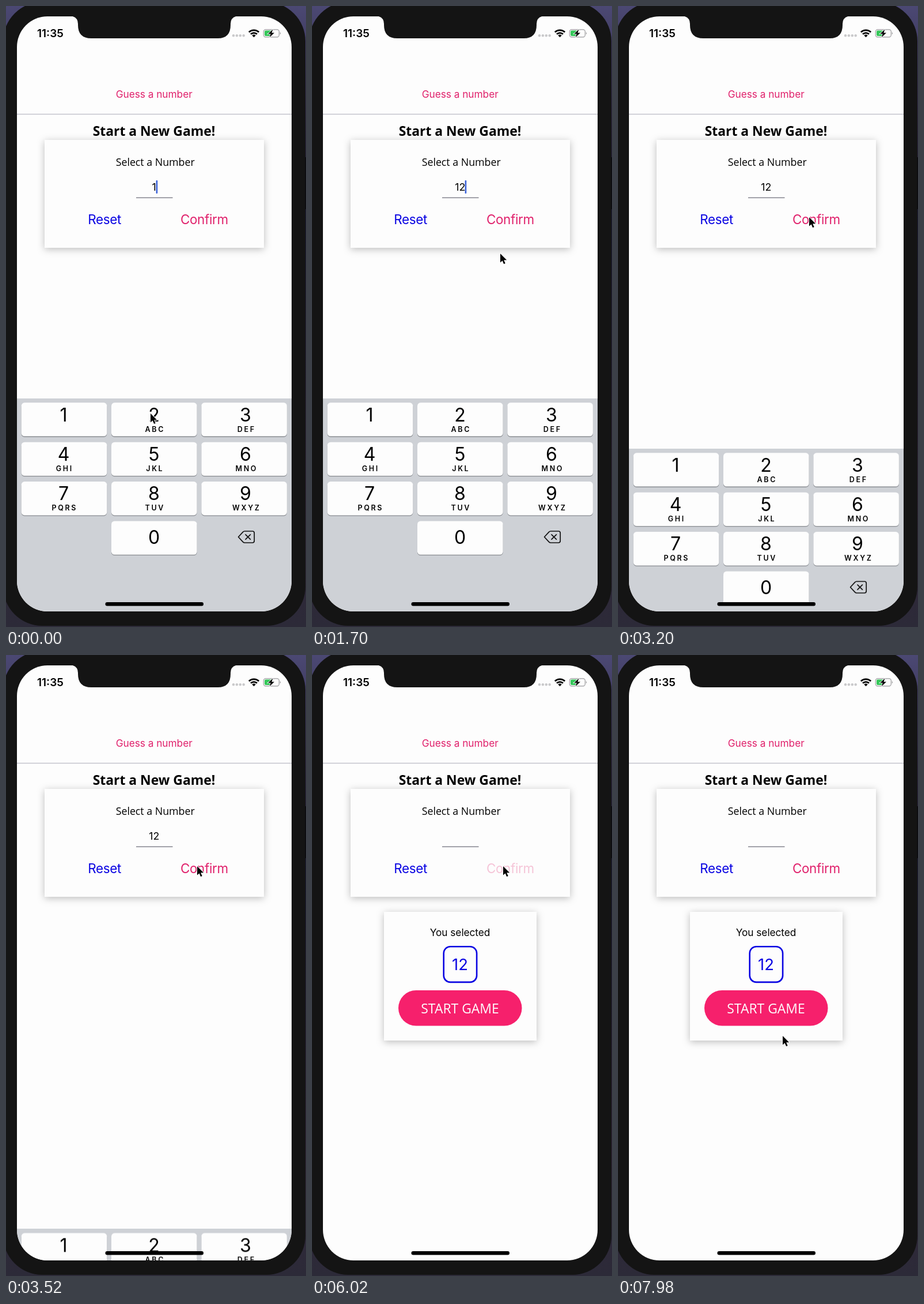
Animation of 521 by 1076 pixels, one loop 8000 ms. Source, as an HTML page:

```html
<!DOCTYPE html>
<html lang="en">
<head>
<meta charset="utf-8">
<title>Guess a number</title>
<style>
  html, body { margin: 0; width: 100%; height: 100%; overflow: hidden; background: #141414; }
  svg { display: block; width: 521px; height: 1076px; }
  text { font-family: Inter, "Liberation Sans", sans-serif; text-anchor: middle; }
  .open { font-family: "Open Sans", "Noto Sans", sans-serif; }
  .label { font-size: 17.3px; letter-spacing: -.05px; }
  .action { font-size: 22.4px; letter-spacing: -.3px; }
  .pink { fill: #e0206b; }
  .blue { fill: #0a04e2; }
  .digit { font-size: 32px; }
  .letters { font-size: 12.5px; font-weight: 600; letter-spacing: 2.7px; }

  .anim { animation: 8s linear infinite; }
  .step { animation-timing-function: step-end; }
  #one { animation-name: one; }
  #twelve { animation-name: twelve; }
  #caret { animation-name: caret; }
  #keyboard { animation-name: slide; }
  #confirm { animation-name: press; }
  #selected { animation-name: appear; }
  #pointer { animation-name: point; animation-timing-function: ease-in-out; }

  @keyframes one { 0% { opacity: 1 } 3.75%, 100% { opacity: 0 } }
  @keyframes twelve { 0% { opacity: 0 } 3.75% { opacity: 1 } 74.75%, 100% { opacity: 0 } }
  @keyframes caret {
    0% { transform: none; opacity: 1 }
    3.75% { transform: translateX(5px); opacity: 1 }
    38.5%, 100% { transform: translateX(5px); opacity: 0 }
  }
  /* critically damped spring, in three arcs */
  @keyframes slide {
    0% { transform: none }
    38.5% { transform: none; animation-timing-function: cubic-bezier(.5, 0, .67, .52) }
    40% { transform: translateY(86px); animation-timing-function: cubic-bezier(.33, .48, .67, .85) }
    44% { transform: translateY(314px); animation-timing-function: cubic-bezier(.2, .67, .4, 1) }
    51%, 100% { transform: translateY(371px) }
  }
  @keyframes press {
    0%, 72.5% { opacity: 1 }
    74.5%, 75.1% { opacity: .22 }
    79%, 100% { opacity: 1 }
  }
  @keyframes appear { 0% { opacity: 0 } 74.75%, 100% { opacity: 1 } }
  @keyframes point {
    0%, 8.5% { transform: translate(251px, 706px) }
    21%, 25% { transform: translate(327px, 429px) }
    34%, 82% { transform: translate(332px, 366px) }
    99%, 100% { transform: translate(286px, 660px) }
  }
</style>
</head>
<body>
<svg viewBox="0 0 521 1076">
  <defs>
    <linearGradient id="backdrop" x1="0" y1="0" x2="0" y2="1">
      <stop offset="0" stop-color="#4b4873"/>
      <stop offset=".2" stop-color="#2e2742"/>
      <stop offset=".35" stop-color="#191a33"/>
      <stop offset=".8" stop-color="#32263a"/>
      <stop offset="1" stop-color="#2c2a38"/>
    </linearGradient>
    <clipPath id="screen"><rect x="19" y="18" width="477" height="1031" rx="53"/></clipPath>
    <filter id="shadow" x="-20%" y="-20%" width="140%" height="140%">
      <feDropShadow dx="0" dy="2.5" stdDeviation="6.5" flood-opacity=".26"/>
    </filter>
  </defs>

  <rect width="521" height="1076" fill="url(#backdrop)"/>
  <rect x="-5" y="-7" width="525" height="1081" rx="68" fill="#141414"/>
  <rect x="519" y="262" width="2" height="90" fill="#0c0c10"/>

  <g clip-path="url(#screen)">
    <rect x="19" y="18" width="477" height="1031" fill="#fdfdfd"/>
    <path d="M110 17 Q125 18 125 31 V33 Q125 56 148 56 H368 Q390 56 390 33 V31 Q390 18 405 17Z" fill="#141414"/>

    <text x="54" y="54" style="font-size:19px;font-weight:600;text-anchor:start">11:35</text>
    <g id="dots" fill="#c9c9cb"></g>
    <g fill="none" stroke="#000" stroke-width="2.7">
      <path d="M421.8 45.3 A12.6 12.6 0 0 1 439.2 45.3"/>
      <path d="M425 48.8 A8 8 0 0 1 436 48.8"/>
    </g>
    <path d="M427.3 51 A4.8 4.8 0 0 1 433.7 51 L430.5 54.3Z"/>
    <rect x="447.3" y="40.8" width="27" height="13" rx="3.6" fill="none" stroke="#9c9c9f" stroke-width="1.2"/>
    <path d="M475.8 45 Q478.6 47.3 475.8 49.6Z" fill="#9c9c9f"/>
    <rect x="449" y="42.5" width="12.5" height="9.6" rx="2" fill="#34c759"/>
    <path d="M463.5 40.6 L455 48.3 H459.6 L457.6 54.3 L466 46.4 H461.4Z" stroke="#fdfdfd" stroke-width="1.6" paint-order="stroke"/>

    <text class="label pink" x="257.2" y="159">Guess a number</text>
    <path d="M19 187.5H496" stroke="#c2c2cc" stroke-width="1.4"/>
    <text class="open" x="257" y="225" style="font-size:22.9px;font-weight:700">Start a New Game!</text>

    <rect x="67" y="232" width="381" height="187" fill="#fdfdfd" filter="url(#shadow)"/>
    <text class="open" x="259.2" y="276.5" style="font-size:17.8px">Select a Number</text>
    <g style="font-size:17.8px">
      <text id="one" class="anim step" x="257" y="319.5">1</text>
      <text id="twelve" class="anim step" x="257.3" y="319.5">12</text>
    </g>
    <rect id="caret" class="anim step" x="260.6" y="302" width="2.6" height="23" rx="1.2" fill="#3b62d9"/>
    <path d="M226 332.3H289.5" stroke="#85858f" stroke-width="1.4"/>
    <text class="action blue" x="171.2" y="378">Reset</text>
    <text id="confirm" class="action pink anim" x="344.4" y="378">Confirm</text>

    <g id="selected" class="anim step">
      <rect x="125" y="445" width="265" height="223" fill="#fdfdfd" filter="url(#shadow)"/>
      <text class="label" x="257" y="487">You selected</text>
      <rect x="228.7" y="505.3" width="57.4" height="61.6" rx="11.5" fill="none" stroke="#0a04e2" stroke-width="2.6"/>
      <text class="blue" x="257" y="546" style="font-size:27.4px">12</text>
      <rect x="150" y="581" width="214.5" height="61.5" rx="30.7" fill="#f6206c"/>
      <text class="open" x="257" y="620.7" fill="#fdfdfd" style="font-size:22.9px">START GAME</text>
    </g>

    <g id="keyboard" class="anim">
      <rect x="19" y="680" width="477" height="371" fill="#ced1d6"/>
      <g id="keys"></g>
      <g fill="none" stroke="#111" stroke-width="1.7" stroke-linejoin="round" stroke-linecap="round">
        <path d="M403.5 920 L411.5 911.3 Q412.8 910 414.5 910 H428 Q431.2 910 431.2 913.2 V926.8 Q431.2 930 428 930 H414.5 Q412.8 930 411.5 928.7Z"/>
        <path d="M416 915.8 l8.4 8.4 m0 -8.4 l-8.4 8.4"/>
      </g>
    </g>
    <rect x="172.5" y="1033" width="170.5" height="6.4" rx="3.2"/>
  </g>

  <g id="pointer" class="anim">
    <path d="M0 0 V15.6 L3.6 12.3 L6.1 18 L8.7 16.9 L6.2 11.3 H11.2Z" stroke="#fff" stroke-width="2" stroke-linejoin="round" paint-order="stroke"/>
  </g>
</svg>
<script>
  const NS = "http://www.w3.org/2000/svg";
  const add = (parent, tag, attrs, text = "") => {
    const el = document.createElementNS(NS, tag);
    for (const name in attrs) el.setAttribute(name, attrs[name]);
    el.textContent = text;
    parent.append(el);
  };

  const dots = document.getElementById("dots");
  for (let i = 0; i < 4; i++) add(dots, "circle", { cx: 395 + 5.9 * i, cy: 51.3, r: 2.2 });

  const keys = document.getElementById("keys");
  const letters = ["", "ABC", "DEF", "GHI", "JKL", "MNO", "PQRS", "TUV", "WXYZ"];
  const labelX = [100, 257, 416];

  function addKey(digit, col, row, sub, baseline) {
    const x = 26.7 + 156.3 * col, y = 687.3 + 68.4 * row;
    const box = { x, width: 148.6, height: 58.3, rx: 5.5 };
    add(keys, "rect", { ...box, y: y + 1.3, fill: "#888b90" });
    add(keys, "rect", { ...box, y, fill: "#fdfdfd" });
    add(keys, "text", { x: labelX[col], y: y + baseline, class: "digit" }, digit);
    if (sub) add(keys, "text", { x: labelX[col] + 1.8, y: y + 50.2, class: "letters" }, sub);
  }

  letters.forEach((sub, i) => addKey(i + 1, i % 3, Math.floor(i / 3), sub, 32.3));
  addKey(0, 1, 3, "", 39.5);
</script>
</body>
</html>
```
